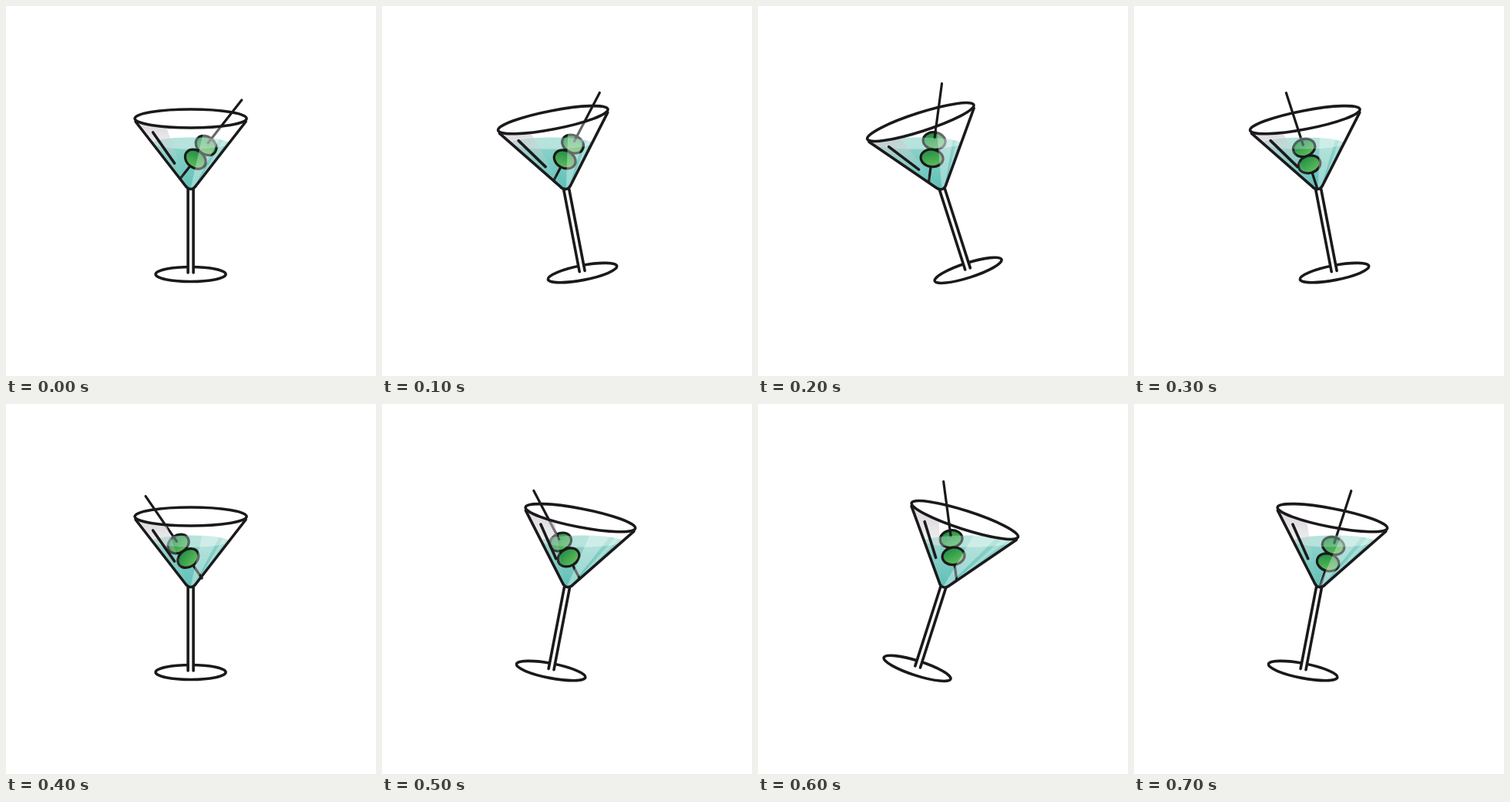
These frames come from a looping animation (480 by 480 pixels, 800 ms). An HTML page with a canvas:

```html
<!DOCTYPE html>
<html lang="en">
<head>
<meta charset="utf-8">
<title>Swaying cocktail</title>
<style>
html, body { margin: 0; width: 100%; height: 100%; overflow: hidden; background: #fff; }
canvas { display: block; width: 100vmin; height: 100vmin; }
</style>
</head>
<body>
<canvas id="stage" width="480" height="480"></canvas>
<script>
const ctx = document.getElementById('stage').getContext('2d');
const INK = '#1b191b';
const STEP = 100;
const PIVOT = { x: 240, y: 240 };
const LEVEL = 178;
const LINE = 3.6;
const rad = deg => deg * Math.PI / 180;

// Glass tilt, upper olive x and y, pick angle
const poses = [
  [0, 260, 181, 38],
  [-10.9, 248, 179, 27.6],
  [-17.8, 229, 175, 7.6],
  [-10.9, 221, 184, -18],
  [0, 224, 181.5, -34.5],
  [10.9, 232, 179, -27.6],
  [17.8, 251, 175, -7.6],
  [10.9, 259, 184, 18]
];

function turn(x, y, deg) {
  const a = rad(deg), dx = x - PIVOT.x, dy = y - PIVOT.y;
  return {
    x: PIVOT.x + dx * Math.cos(a) - dy * Math.sin(a),
    y: PIVOT.y + dx * Math.sin(a) + dy * Math.cos(a)
  };
}

function tiltBy(deg) {
  ctx.translate(PIVOT.x, PIVOT.y);
  ctx.rotate(rad(deg));
  ctx.translate(-PIVOT.x, -PIVOT.y);
}

function scoped(draw) {
  ctx.save();
  draw();
  ctx.restore();
}

function line(x1, y1, x2, y2, width = LINE) {
  ctx.lineWidth = width;
  ctx.beginPath();
  ctx.moveTo(x1, y1);
  ctx.lineTo(x2, y2);
  ctx.stroke();
}

function oval(x, y, rx, ry) {
  ctx.beginPath();
  ctx.ellipse(x, y, rx, ry, 0, 0, Math.PI * 2);
}

function fade(x1, y1, x2, y2, from, to) {
  const g = ctx.createLinearGradient(x1, y1, x2, y2);
  g.addColorStop(0, from);
  g.addColorStop(1, to);
  return g;
}

function bowlSides() {
  ctx.moveTo(168.5, 150);
  ctx.lineTo(233, 233);
  ctx.quadraticCurveTo(236, 237.5, 240, 237.5);
  ctx.quadraticCurveTo(244, 237.5, 247, 233);
  ctx.lineTo(311.5, 150);
}

// Clips to the bowl below the front rim; leaves the axes level
function clipBowl(tilt) {
  tiltBy(tilt);
  ctx.beginPath();
  bowlSides();
  ctx.ellipse(240, 146, 72.5, 12, 0, 0.2, Math.PI - 0.2);
  ctx.closePath();
  ctx.clip();
  tiltBy(-tilt);
}

// Where a bowl wall meets the liquid level
function wallAt(side, tilt) {
  const a = turn(240 + side * 71.5, 150, tilt);
  const b = turn(240 + side * 7, 233, tilt);
  return a.x + (b.x - a.x) * (LEVEL - a.y) / (b.y - a.y);
}

function surface(tilt, fill) {
  const left = wallAt(-1, tilt), right = wallAt(1, tilt);
  oval((left + right) / 2, LEVEL, (right - left) / 2, 7.5);
  ctx.fillStyle = fill;
  ctx.fill();
}

function drawLiquid(tilt) {
  clipBowl(tilt);
  ctx.fillStyle = fade(0, LEVEL, 0, 238, '#8fd3ca', '#5fc0b7');
  ctx.fillRect(140, LEVEL, 200, 65);
  surface(tilt, '#b2e2da');
}

function drawOlive(y) {
  oval(0, y, 14.5, 11.2);
  ctx.fillStyle = fade(-4, y - 11, 4, y + 11, '#1f8f45', '#62bd5c');
  ctx.fill();
  ctx.lineWidth = 3.2;
  ctx.stroke();
}

function drawPick(x, y, angle, draw) {
  scoped(() => {
    ctx.translate(x, y);
    ctx.rotate(rad(angle));
    draw();
  });
}

function drawUpperPick() {
  line(0, 30, 0, 54, 3.2);
  drawOlive(0);
  line(0, -75, 0, -4, 3.2);
}

function wedge(x1, x2, tip1, tip2, fill) {
  ctx.beginPath();
  ctx.moveTo(x1, 148);
  ctx.lineTo(x2, 148);
  ctx.lineTo(tip2, 236);
  ctx.lineTo(tip1, 236);
  ctx.fillStyle = fill;
  ctx.fill();
}

function drawSheen(tilt) {
  clipBowl(tilt);
  tiltBy(tilt);
  wedge(166, 205, 232, 237, fade(0, 160, 0, 205, 'rgba(205,200,205,.6)', 'rgba(205,215,215,.08)'));
  wedge(260, 290, 240, 244, 'rgba(255,255,255,.34)');
  wedge(298, 305, 245, 246, 'rgba(255,255,255,.3)');
}

function drawOutline() {
  oval(240, 348, 45.5, 9.5);
  ctx.lineWidth = LINE;
  ctx.stroke();
  ctx.fillStyle = '#fff';
  ctx.fillRect(236.5, 238, 7, 108);
  line(236.5, 238, 236.5, 346);
  line(243.5, 238, 243.5, 346);
  oval(240, 146, 72.5, 12);
  ctx.stroke();
  ctx.beginPath();
  bowlSides();
  ctx.stroke();
  line(191, 164, 219, 204);
}

function render(time) {
  const [tilt, x, y, angle] = poses[Math.floor(time / STEP) % poses.length];
  ctx.fillStyle = '#fff';
  ctx.fillRect(0, 0, 480, 480);
  ctx.strokeStyle = INK;
  ctx.lineCap = ctx.lineJoin = 'round';
  scoped(() => {
    ctx.translate(-0.4, 0);
    scoped(() => drawLiquid(tilt));
    drawPick(x, y, angle, drawUpperPick);
    scoped(() => {
      clipBowl(tilt);
      surface(tilt, 'rgba(190,230,222,.35)');
    });
    drawPick(x, y, angle, () => drawOlive(22.5));
    scoped(() => drawSheen(tilt));
    tiltBy(tilt);
    drawOutline();
  });
}

const start = performance.now();
function tick() {
  render(performance.now() - start);
  requestAnimationFrame(tick);
}
tick();
</script>
</body>
</html>
```
